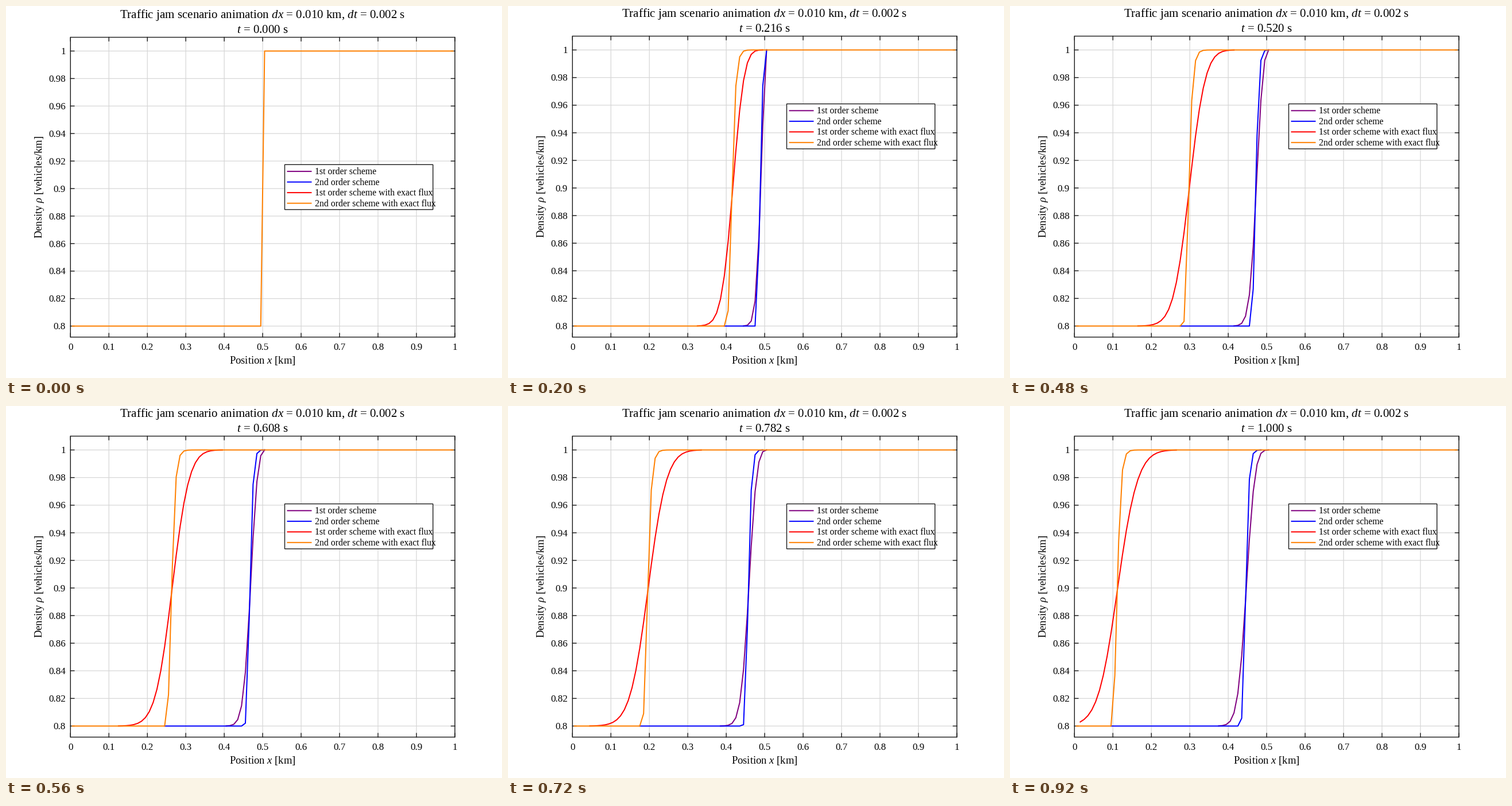
These frames come from a looping animation (864x648 px, 0.96 s). A matplotlib script:

```python
import numpy as np
import matplotlib.pyplot as plt
from matplotlib.animation import FuncAnimation
from matplotlib.patches import Rectangle

plt.rcParams.update({
    "font.family": "Liberation Serif",
    "mathtext.fontset": "custom",
    "mathtext.rm": "Liberation Serif",
    "mathtext.it": "Liberation Serif:italic",
})

W, H, DPI = 864, 648, 72          # at 72 dpi one point is one pixel
FRAMES, INTERVAL = 24, 40
DX, DT, STEPS = 0.01, 0.002, 500
LEFT, RIGHT, BOTTOM = 0.13 * W, 0.905 * W, 0.89 * H
RHO_MIN, RHO_MAX = 0.792, 1.01
INK, GRID, ICON = "#1a1a1a", "#d6d6d6", "#6e6e6e"
TOOLBAR = range(7, 11)
ICON_Y = 40

cells = (np.arange(100) + 0.5) * DX


def linear_flux(rho):
    return 0.067 * rho * (1 - rho)


def log_flux(rho):
    return -rho * np.log10(rho)


SERIES = [
    ("1st order scheme", "#800080", linear_flux, False),
    ("2nd order scheme", "#0000ff", linear_flux, True),
    ("1st order scheme with exact flux", "#ff0000", log_flux, False),
    ("2nd order scheme with exact flux", "#ff8000", log_flux, True),
]


def superbee(a, b):
    big = np.maximum(np.minimum(2 * a, b), np.minimum(a, 2 * b))
    return np.where((a > 0) & (b > 0), big, 0)


def rate(rho, flux, second):
    """Upwind finite volume rate; waves travel to the left."""
    r = np.concatenate(([0.8], rho, [1.0, 1.0]))
    face = r[1:-1]
    if second:
        step = np.diff(r)
        face = face - superbee(step[:-1], step[1:]) / 2
    out = -np.diff(flux(face)) / DX
    out[0] = 0
    return out


def solve(flux, second):
    rho = np.where(cells < 0.5, 0.8, 1.0)
    states = [rho]
    for _ in range(STEPS):
        slope = rate(rho, flux, second)
        if second:
            slope = (slope + rate(rho + DT * slope, flux, second)) / 2
        rho = rho + DT * slope
        states.append(rho)
    return np.array(states)


solutions = [solve(flux, second) for _, _, flux, second in SERIES]

fig = plt.figure(figsize=(W / DPI, H / DPI), dpi=DPI, facecolor="white")
ax = fig.add_axes([0, 0, 1, 1])


def line(xs, ys, color=INK, lw=1.4, z=2, **kw):
    ax.plot(xs, ys, color=color, lw=lw, zorder=z, snap=False, **kw)


def box(x, y, w, h, color=INK, lw=1.4, z=3, face="none"):
    ax.add_patch(Rectangle((x, y), w, h, fc=face, ec=color, lw=lw, zorder=z,
                           snap=False))


def label(x, y, s, size, ha="center", **kw):
    ax.text(x, y, s, fontsize=size, ha=ha, va="baseline", color="black",
            zorder=8, **kw)


def px(x):
    return LEFT + (RIGHT - LEFT) * x


def draw_axes(top, py):
    for x in np.arange(11) / 10:
        u = px(x)
        line([u, u], [top, BOTTOM], GRID, 1.2, 1)
        line([u, u], [BOTTOM, BOTTOM - 6.5])
        line([u, u], [top, top + 6.5])
        label(u, 599, f"{x:g}", 17)
    for rho in 0.8 + np.arange(11) / 50:
        v = py(rho)
        line([LEFT, RIGHT], [v, v], GRID, 1.2, 1)
        line([LEFT, LEFT + 6.5], [v, v])
        line([RIGHT, RIGHT - 6.5], [v, v])
        label(104, v + 5.7, f"{rho:.2g}", 17, "right")
    box(LEFT, top, RIGHT - LEFT, BOTTOM - top)


def draw_curves(step, py):
    now = [s[step] for s in solutions]
    for k, (_, color, _, _) in enumerate(SERIES):
        # leave out stretches that a later curve covers
        shown = np.ones(len(cells), bool)
        for later in now[k + 1:]:
            shown &= np.abs(now[k] - later) > 1e-4
        shown[1:-1] |= shown[:-2] | shown[2:]
        y = np.where(shown, py(now[k]), np.nan)
        line(px(cells), y, color, 2, 4 + k / 10)


def draw_legend(top):
    box(485.5, top, 258.2, 78.3, z=6, face="white")
    for k, (name, color, _, _) in enumerate(SERIES):
        y = top + 11.8 + 18.5 * k
        line([489.5, 532.5], [y, y], color, 2, 7, solid_capstyle="butt")
        label(537.5, y + 5, name, 15.7, "left")


def arc(cx, cy, r, start=0, end=360):
    a = np.radians(np.linspace(start, end, 30))
    line(cx + r * np.cos(a), cy + r * np.sin(a), ICON, 1.3, 9)


def stroke(xs, ys, lw=1.3):
    line(xs, ys, ICON, lw, 9)


def icon_box(cx, cy, w, h):
    box(cx - w / 2, cy - h / 2, w, h, ICON, 1.3, 9)


def draw_toolbar():
    y = ICON_Y
    export, brush, note, hand, zoom_in, zoom_out, home = (
        641 + 21.6 * np.arange(7))

    icon_box(export, y + 5, 16, 6)
    arc(export + 4, y + 4, 8, 180, 270)
    stroke(export + np.array([1, 6, 1]), y + np.array([-8, -4, 0]))

    icon_box(brush + 2, y - 5, 3, 8)
    icon_box(brush, y + 1, 8, 3)
    stroke(brush + np.array([-4, -7, 6, 4]), y + np.array([3, 8, 8, 3]))

    icon_box(note, y, 13, 16)
    for dy in (-4, 0, 4):
        stroke([note - 3, note + 4], [y + dy, y + dy])

    arc(hand, y + 2, 6, 0, 180)
    for k in range(4):
        u = hand - 4.5 + 3 * k
        stroke([u, u], [y + 1, y - 5 - 2 * np.sin(np.pi * (k + 0.5) / 4)])
    stroke([hand - 6, hand - 8], [y + 3, y - 1])

    for cx in (zoom_in, zoom_out):
        arc(cx - 1.5, y - 1.5, 6)
        stroke([cx + 3, cx + 8.5], [y + 3, y + 8.5], 2)
        stroke([cx - 4.5, cx + 1.5], [y - 1.5, y - 1.5])
    stroke([zoom_in - 1.5] * 2, [y - 4.5, y + 1.5])

    stroke(home + np.array([-9, 0, 9]), y + np.array([1, -8, 1]))
    icon_box(home, y + 3.5, 12, 9)
    icon_box(home, y + 5, 4, 6)


def draw(i):
    ax.clear()
    ax.set(xlim=(0, W), ylim=(H, 0))
    ax.axis("off")

    # the layout settles by two pixels after the opening frame
    shift = 2 if i == 0 else 0
    top = 52.5 + shift
    step = i * STEPS // (FRAMES - 1)

    def py(rho):
        return BOTTOM - (BOTTOM - top) * (rho - RHO_MIN) / (RHO_MAX - RHO_MIN)

    draw_axes(top, py)
    draw_curves(step, py)
    draw_legend(276.3 if i == 0 else 170.5)

    label(447, 19.3 + shift, "Traffic jam scenario animation "
          "$dx$ = 0.010 km, $dt$ = 0.002 s", 21)
    label(447, 44.8 + shift, f"$t$ = {step * DT:.3f} s", 21)
    label(447, 623, "Position $x$ [km]", 18.65)
    label(63, 314.5 + shift / 2, r"Density $\rho$ [vehicles/km]", 18.65,
          rotation=90, rotation_mode="anchor")
    if i in TOOLBAR:
        draw_toolbar()
    return []


anim = FuncAnimation(fig, draw, frames=FRAMES, interval=INTERVAL,
                     repeat=True, repeat_delay=0)
plt.show()
```
